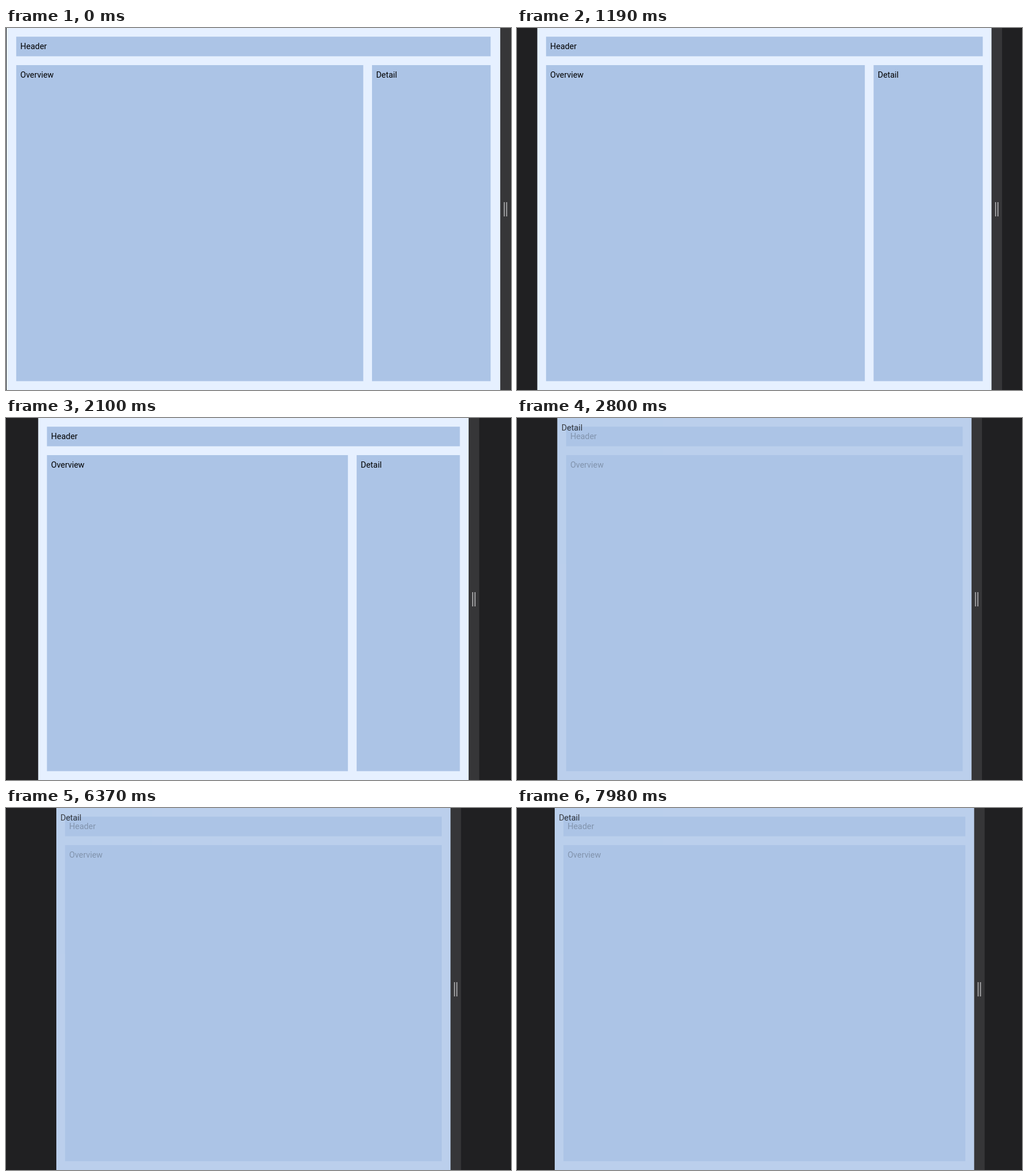
Write an HTML page that moves like this. It is 883 px wide and 634 px high and loops after 8000 ms.

```html
<!DOCTYPE html>
<html lang="en">
<head>
<meta charset="utf-8">
<title>Resizable layout</title>
<style>
  html, body { margin: 0; width: 883px; height: 634px; overflow: hidden; background: #000; }
  svg { display: block; }
  text { font: 14.4px Roboto, "Liberation Sans", sans-serif; fill: #000; }
  .panel { fill: #acc4e6; }
  .grip { fill: #aeaeb0; }
</style>
</head>
<body>
<svg width="883" height="634" viewBox="0 0 883 634">
  <rect width="883" height="634" rx="3" fill="#202022"/>
  <rect id="handle" height="634" fill="#363638"/>
  <rect id="page" height="634" fill="#e6f0ff"/>
  <rect id="header" class="panel" y="15.2" height="34.3"/>
  <text id="headerText" y="37">Header</text>
  <rect id="overview" class="panel" y="65" height="553.5"/>
  <text id="overviewText" y="86.7">Overview</text>
  <g id="detailGroup">
    <rect id="detail" class="panel"/>
    <text id="detailText">Detail</text>
  </g>
  <rect id="gripA" class="grip" y="305" width="1.7" height="25"/>
  <rect id="gripB" class="grip" y="305" width="1.7" height="25"/>
</svg>
<script>
const LOOP = 8000, STEP = 70;
const GAP = 15.3, TEXT_INSET = 7.2, HANDLE = 18.5;
const EDGE_SUM = 865.2; // page left + page right, since the page stays centred
const MAX_INNER = 829.5, BREAKPOINT = 739;

// Left edge of the page over time: drag in, pause, drag in, pause, drag out.
const drag = [
  [0, 1], [840, 27.5], [2100, 56.3], [2940, 73.5],
  [3150, 73.5], [3850, 89], [6300, 89], [LOOP, 65.7]
];

const el = id => document.getElementById(id);
const set = (id, attrs) => {
  for (const name in attrs) el(id).setAttribute(name, attrs[name]);
};
const span = (id, left, right) => set(id, { x: left, width: right - left });

function leftAt(time) {
  const i = drag.findIndex(([t]) => t > time);
  const [t0, x0] = drag[i - 1], [t1, x1] = drag[i];
  return x0 + (x1 - x0) * (time - t0) / (t1 - t0);
}

function draw(time) {
  const left = leftAt(Math.floor(time / STEP) * STEP);
  const right = EDGE_SUM - left;
  const width = right - left;
  const pad = Math.max(GAP, (width - MAX_INNER) / 2);
  const inL = left + pad, inR = right - pad;
  const narrow = width < BREAKPOINT;
  const detailL = narrow ? left : inR - (inR - inL) / 4;

  span('page', left, right);
  span('handle', right, right + HANDLE);
  span('header', inL, inR);
  span('overview', inL, narrow ? inR : detailL - GAP);
  set('headerText', { x: inL + TEXT_INSET });
  set('overviewText', { x: inL + TEXT_INSET });

  // Below the breakpoint the detail panel covers the page.
  span('detail', detailL, narrow ? right : inR);
  set('detail', narrow ? { y: 0, height: 634 } : { y: 65, height: 553.5 });
  set('detailText', { x: detailL + TEXT_INSET, y: narrow ? 21.7 : 86.7 });
  set('detailGroup', { opacity: narrow ? 0.75 : 1 });

  const mid = right + HANDLE / 2;
  set('gripA', { x: mid - 3 });
  set('gripB', { x: mid + 1.1 });
}

const start = performance.now();
function tick() {
  draw((performance.now() - start) % LOOP);
  requestAnimationFrame(tick);
}
tick();
</script>
</body>
</html>
```
